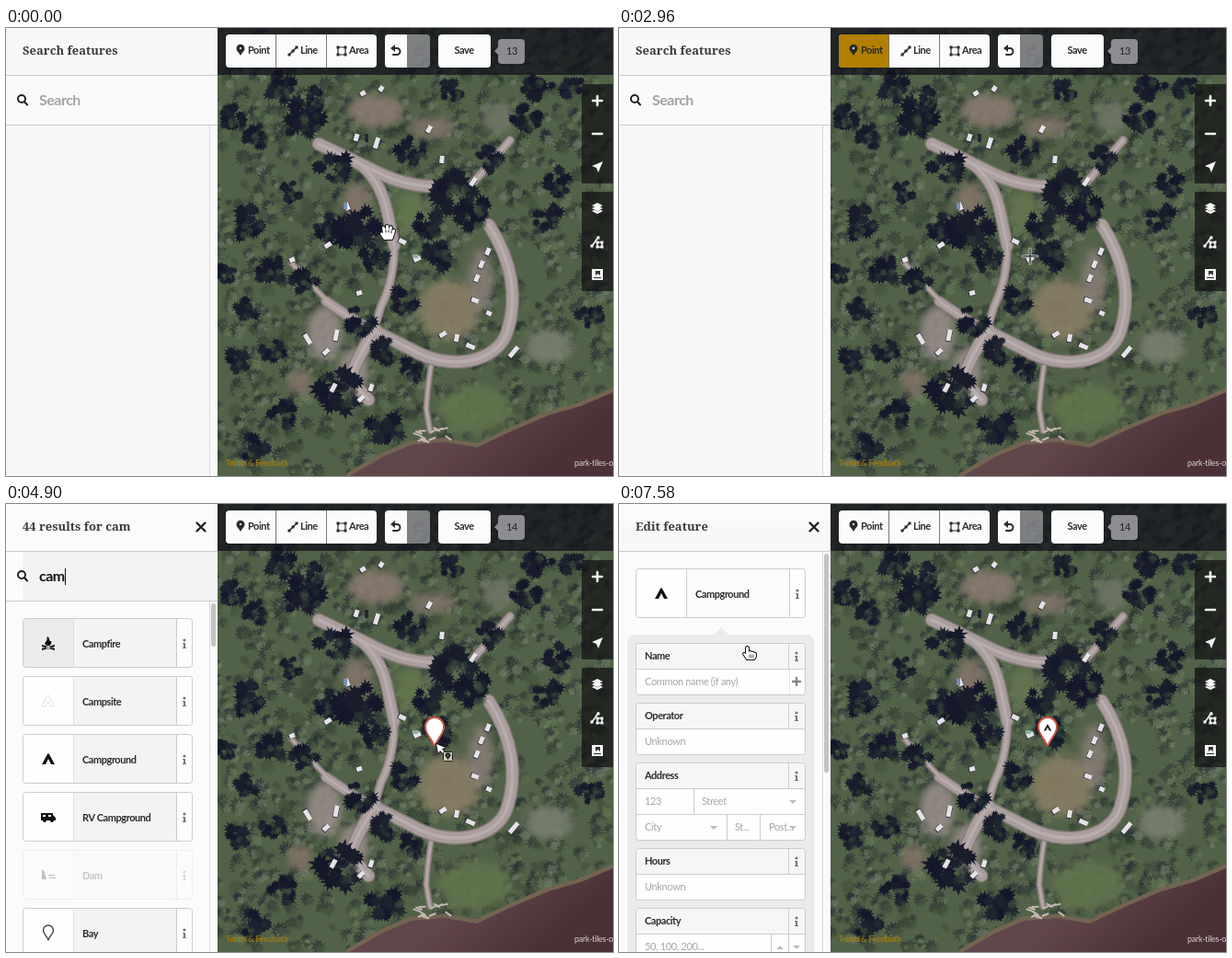
Animation, 660 px wide and 487 px high, one loop 8 s. Source, as an HTML page with a canvas:

```html
<!DOCTYPE html>
<html lang="en">
<head>
<meta charset="utf-8">
<title>Map editor: adding a point</title>
<style>
html, body { margin: 0; width: 100%; height: 100%; overflow: hidden; background: #f7f7f7; }
canvas { display: block; width: 660px; height: 487px; }
</style>
</head>
<body>
<canvas id="stage" width="660" height="487"></canvas>
<script>
const W = 660, H = 487, LOOP = 8000, SIDE = 230;
const TAU = Math.PI * 2;
const INK = '#2b2b2b', LINE = '#cccccc', PALE = '#a6a6a6';
const stage = document.getElementById('stage').getContext('2d');
let g = stage;

// ---------- drawing helpers ----------
function rect(x, y, w, h, color) {
  g.fillStyle = color;
  g.fillRect(x, y, w, h);
}
function box(x, y, w, h, r, fill, line) {
  g.beginPath();
  g.roundRect(x, y, w, h, r);
  if (fill) { g.fillStyle = fill; g.fill(); }
  if (line) { g.strokeStyle = line; g.lineWidth = 1; g.stroke(); }
}
function shape(d, x, y, fill, line, width = 1) {
  const p = new Path2D(d);
  g.save();
  g.translate(x, y);
  g.lineJoin = g.lineCap = 'round';
  if (line) { g.strokeStyle = line; g.lineWidth = width; g.stroke(p); }
  if (fill) { g.fillStyle = fill; g.fill(p); }
  g.restore();
}
function text(s, x, y, { size = 11, bold = true, color = INK, align = 'left', gap } = {}) {
  g.font = `${bold ? 'bold ' : ''}${size}px Lato, sans-serif`;
  g.letterSpacing = `${gap ?? (bold ? -0.45 : -0.35)}px`;
  g.textAlign = align;
  g.fillStyle = color;
  g.fillText(s, x, y);
}
function title(s) {
  g.font = 'bold 13px "Noto Serif", serif';
  g.letterSpacing = '0px';
  g.textAlign = 'left';
  g.fillStyle = '#3a3a3a';
  g.fillText(s, 18, 29);
}

// ---------- aerial picture, painted once ----------
function random(seed) {
  return () => {
    seed = (seed + 0x6D2B79F5) | 0;
    let n = Math.imul(seed ^ (seed >>> 15), 1 | seed);
    n = (n + Math.imul(n ^ (n >>> 7), 61 | n)) ^ n;
    return ((n ^ (n >>> 14)) >>> 0) / 4294967296;
  };
}

const SHADE = [
  [246, 98, 16], [272, 118, 15], [322, 100, 24], [336, 78, 14], [356, 152, 20], [310, 178, 13],
  [350, 218, 16], [386, 222, 29], [398, 250, 17], [262, 212, 20], [285, 262, 20], [325, 275, 17],
  [262, 304, 14], [486, 178, 26], [508, 200, 20], [462, 212, 19], [468, 246, 19], [442, 134, 18],
  [526, 142, 15], [566, 98, 17], [578, 62, 18], [600, 168, 17], [588, 206, 17], [636, 312, 16],
  [618, 66, 15], [384, 318, 17], [362, 394, 25], [412, 350, 16], [440, 372, 15], [414, 434, 21],
  [432, 294, 18], [252, 362, 16], [290, 350, 15], [268, 458, 17], [302, 420, 17], [240, 268, 13],
  [484, 66, 14], [298, 64, 17]
];
const CLEARINGS = [
  [402, 90, 30, 18, '#8d7c72'], [464, 108, 26, 12, '#7f7468'], [482, 306, 34, 33, '#8c8067'],
  [346, 332, 19, 30, '#9b8d8b'], [382, 190, 15, 22, '#86766c'], [516, 274, 13, 34, '#8b7f78'],
  [440, 200, 18, 22, '#65784f'], [378, 372, 16, 24, '#9d8f8e'], [590, 346, 26, 18, '#7c8272'],
  [510, 415, 40, 26, '#63764e'], [535, 98, 18, 17, '#747a68'], [320, 385, 13, 14, '#857268']
];
const ROADS = [
  ['M340 126Q370 140 402 156T464 172', 12], ['M382 146Q407 163 415 202T422 236', 11],
  ['M422 232Q423 272 408 302L400 328', 7], ['M508 168L526 148L548 122', 7],
  ['M525 214C552 256 556 296 545 330S482 374 440 349L402 330', 12],
  ['M348 297Q372 314 402 331', 9], ['M402 328Q382 356 374 382L394 404', 12],
  ['M462 368Q458 394 457 414L461 438', 4], ['M310 255L352 300', 4]
];
const CARS = [
  [381, 119, .3, 4], [403, 125, .3, 6], [388, 71, 1, 3], [408, 66, .6, 3], [460, 110, .5, 4],
  [474, 143, .1, 4], [508, 167, .6, 5], [371, 194, -.4, 4], [431, 232, 2, 4], [447, 251, 1.1, 4],
  [350, 236, 1, 4], [524, 243, .4, 4], [517, 257, .4, 4], [512, 272, .4, 4], [510, 296, 1.9, 4],
  [525, 310, 2, 3], [475, 333, 1, 4], [490, 337, .2, 4], [505, 346, 2, 5], [552, 352, .7, 7],
  [328, 338, 2.6, 6], [359, 334, .2, 6], [348, 352, .8, 4], [356, 391, .5, 5], [386, 403, .8, 4],
  [397, 391, .3, 4], [384, 288, 1.3, 3], [311, 252, 1.2, 3]
];

function paintMap() {
  const canvas = document.createElement('canvas');
  canvas.width = W;
  canvas.height = H;
  g = canvas.getContext('2d');
  const rnd = random(41);
  const between = (a, b) => a + rnd() * (b - a);
  const pick = list => list[Math.floor(rnd() * list.length)];

  function crown(x, y, r, color) {
    const n = 9 + Math.floor(rnd() * 5), turn = rnd() * TAU;
    g.beginPath();
    for (let i = 0; i < n * 2; i++) {
      const a = turn + i * Math.PI / n, d = r * (i % 2 ? between(.45, .7) : between(.8, 1.2));
      g.lineTo(x + Math.cos(a) * d, y + Math.sin(a) * d);
    }
    g.fillStyle = color;
    g.fill();
  }

  rect(SIDE, 0, W - SIDE, H, '#526248');
  for (let i = 0; i < 1300; i++) {
    const x = between(SIDE, W), y = between(0, H), r = between(4, 10);
    g.globalAlpha = .5;
    crown(x - 3, y - 3, r, pick(['#252e2d', '#1e2430', '#39463a']));
    g.globalAlpha = .6;
    crown(x, y, r * .8, pick(['#4b5d40', '#5d704e', '#6b7e59', '#43543c', '#74836a']));
  }
  g.globalAlpha = .85;
  g.filter = 'blur(4px)';
  for (const [x, y, rx, ry, color] of CLEARINGS) {
    g.beginPath();
    g.ellipse(x, y, rx, ry, 0, 0, TAU);
    g.fillStyle = color;
    g.fill();
  }
  g.filter = 'blur(.7px)';
  g.globalAlpha = 1;
  for (const [d, w] of ROADS) shape(d, 0, 0, null, '#857b76', w + 3);
  for (const [d, w] of ROADS) shape(d, 0, 0, null, '#aa9d9e', w);
  for (const [d, w] of ROADS) shape(d, 0, 0, null, '#b8acac', w * .3);

  for (const [x, y, r] of SHADE) {
    for (let i = 0; i < 15; i++) {
      const a = rnd() * TAU, d = r * Math.sqrt(rnd()) * .85;
      crown(x + Math.cos(a) * d, y + Math.sin(a) * d, between(.25, .5) * r, pick(['#15182a', '#191d2b', '#1d2430']));
    }
    g.globalAlpha = .6;
    for (let i = 0; i < 5; i++) {
      crown(x + between(-.2, .8) * r, y + between(-.2, .8) * r, r * .25, pick(['#33413a', '#41523d', '#26302f']));
    }
    g.globalAlpha = 1;
  }

  for (const [x, y, a, len] of CARS) {
    g.save();
    g.translate(x, y);
    g.rotate(a);
    rect(-3, -len + 1, 6, len * 2, '#292a38');
    rect(-2.5, -len, 5, len * 2, '#e4e2e5');
    g.restore();
  }
  rect(390, 115, 4, 9, '#252638');
  rect(367, 190, 4, 7, '#7790b0');
  rect(442, 246, 6, 4, '#88b0a0');

  // shore and water
  const shore = 'M660 396L625 411L590 421L550 438L512 456L476 450L441 453L410 466L374 487';
  shape(shore, 0, 0, null, '#726451', 9);
  const water = g.createLinearGradient(500, 430, 560, 500);
  water.addColorStop(0, '#61464a');
  water.addColorStop(1, '#4b3136');
  shape(shore + 'H660Z', 0, 0, water);
  for (let i = 0; i < 13; i++) {
    g.save();
    g.translate(between(438, 484), between(434, 450));
    g.rotate(between(-.7, .7));
    rect(-4, -1, 8, 2, '#c4b7b2');
    g.restore();
  }
  g.filter = 'none';
  rect(SIDE, 0, W - SIDE, 51, 'rgba(14,14,25,.72)');
  rect(626, 61, 34, 108, 'rgba(18,18,20,.72)');
  rect(626, 178, 34, 108, 'rgba(18,18,20,.72)');
  g = stage;
  return canvas;
}
const map = paintMap();

// ---------- icons ----------
const PIN = 'M0 6C-2 2-4.5 1-4.5-1.8A4.5 4.5 0 0 1 4.5-1.8C4.5 1 2 2 0 6Z';
const TENT = 'M0-6L1-5L7 6H3L0 0L-3 6H-7L-1-5Z';
const FIRE = 'M-1-7C3-4 0-2 3-2C4 1 2 3 0 3C-5 3-4-1-2-2C-1-4-2-5-1-7ZM-7 2L7 6V8L-7 4ZM7 2L-7 6V8L7 4Z';
const RV = 'M-8-4H5V-2L8 1V4H6A2 2 0 0 1 2 4H-2A2 2 0 0 1-6 4H-8ZM-6-2V0H-3V-2ZM0-2V0H3V-2Z';
const DAM = 'M-7-5H-5L-2 5H-7ZM0 0H7V1H0ZM1 3H8V4H1Z';
const DIVER = 'M-7-5L-4-4L0 1L5 2L8 6L4 5L0 4L-4 0ZM-1-2A2 2 0 1 1 3-2A2 2 0 1 1-1-2Z';
const CROSS = 'M-4.5-4.5L4.5 4.5M4.5-4.5L-4.5 4.5';
const ICONS = { Campfire: FIRE, Campground: TENT, 'RV Campground': RV, Dam: DAM, 'Scuba Diving': DIVER };

function presetIcon(name, y) {
  if (name === 'Campsite') shape('M0-6L7 6H3L0 1L-3 6H-7Z', 46, y, null, '#e2e2e2');
  else if (ICONS[name]) shape(ICONS[name], 46, y, '#111');
  else shape('M0 8C-2 3-5.5 1-5.5-2.5A5.5 5.5 0 0 1 5.5-2.5C5.5 1 2 3 0 8Z', 46, y, null, '#444', 1.4);
}
function info(x, y) {
  g.beginPath();
  g.arc(x, y - 4, 1.6, 0, TAU);
  g.fillStyle = '#777';
  g.fill();
  shape('M-2-1H1V4H2V5H-2V4H-1V0H-2Z', x, y, '#777');
}
function nodes(points, x, y, color) {
  for (const [dx, dy] of points) rect(x + dx - 1.5, y + dy - 1.5, 3, 3, color);
}
const CORNERS = [[-4, -4], [4, -4], [4, 4], [-4, 4]];

// ---------- toolbar and map controls ----------
function toolbar(s) {
  box(239, 7, 164, 36, 4, '#fbfbfb');
  if (s.tool !== 'idle') box(239, 7, 55, 36, [4, 0, 0, 4], s.tool === 'on' ? '#b27f00' : '#ececec');
  rect(293, 7, 1, 36, '#777');
  rect(348, 7, 1, 36, '#777');
  shape(PIN, 255, 24, INK);
  rect(254, 21, 2, 2, '#fff');
  text('Point', 263, 28);
  shape('M-4 4L4-4', 312, 25, null, INK, 1.5);
  nodes([[-4, 4], [0, 0], [4, -4]], 312, 25, INK);
  text('Line', 320, 28);
  shape('M-4-4H4V4H-4Z', 365, 25, null, INK, 1.2);
  nodes(CORNERS, 365, 25, INK);
  text('Area', 373, 28);

  box(412, 7, 24, 36, [4, 0, 0, 4], '#fbfbfb');
  box(436, 7, 25, 36, [0, 4, 4, 0], 'rgba(255,255,255,.42)');
  const arrow = 'M-2-3H1A3.5 3.5 0 0 1 1 4H-3';
  shape(arrow, 424, 25, null, INK, 2);
  shape('M-6-3L-1-7V1Z', 424, 25, INK);
  g.save();
  g.translate(449, 25);
  g.scale(-1, 1);
  shape(arrow, 0, 0, null, '#77777c', 2);
  shape('M-6-3L-1-7V1Z', 0, 0, '#77777c');
  g.restore();
  box(470, 7, 57, 36, 4, '#fbfbfb');
  text('Save', 498, 28, { align: 'center' });
  box(535, 12, 29, 27, 4, '#8c8c91');
  shape('M0 0L5-5V5Z', 531, 25, '#8c8c91');
  text(s.count, 550, 29, { bold: false, align: 'center', color: '#222' });
}
function controls() {
  const white = '#f6f6f6';
  shape('M-5 0H5M0-5V5', 643, 79, null, white, 2.6);
  shape('M-5 0H5', 643, 115, null, white, 2.6);
  shape('M6-6L1 6L-1 1L-6-1Z', 643, 151, white);
  for (const dy of [3, 0, -3]) {
    shape('M0-4L6-1L0 2L-6-1Z', 643, 197 + dy, white, dy < 0 ? null : '#333', .8);
  }
  shape('M-6 4L-3 0L1-6M0 0H5V5H0Z', 643, 233, null, white, 1.6);
  nodes([[-6, 4], [1, -5], [0, 0], [5, 0], [5, 5], [0, 5]], 643, 233, white);
  shape('M-6-6H6V6H-6ZM-4 3V4H4V3ZM-2-4H3V1L.5-1L-2 1Z', 643, 268, white);
  shape('M-2-4H3V1L.5-1L-2 1Z', 643, 268, '#333');
  text('Terms & Feedback', 239, 476, { size: 9, bold: false, gap: -.25, color: '#b57f00' });
  text('park-tiles-o', 618, 476, { size: 9, bold: false, gap: -.25, color: '#d5d0d0' });
}
function tooltip(alpha) {
  if (!alpha) return;
  g.save();
  g.globalAlpha = alpha;
  shape('M-7 6L0 0L7 6Z', 283, 55, 'rgba(255,255,255,.8)');
  rect(230, 61, 180, 72, 'rgba(240,240,238,.88)');
  rect(230, 133, 180, 36, 'rgba(228,228,228,.92)');
  const lines = ['Add visitor centers, entrance', 'stations, picnic areas, or other', 'points of interest to the map.'];
  lines.forEach((s, i) => text(s, 320, 82 + i * 18, { bold: false, align: 'center' }));
  text('Shortcut:', 296, 154, { bold: false });
  text('1', 339, 154);
  g.restore();
}
function pin(kind) {
  if (!kind) return;
  const drop = 'M0 18C-3 11-9 6-9-1A9 9 0 0 1 9-1C9 6 3 11 0 18Z';
  shape(drop, 466, 243, '#fff', '#d4543f', 4);
  shape(drop, 466, 243, '#fff', '#7a5b52', .7);
  if (kind === 'tent') {
    g.save();
    g.translate(466, 243);
    g.scale(.6, .6);
    shape(TENT, 0, 0, '#222');
    g.restore();
  }
}

// ---------- sidebar ----------
function close() { shape(CROSS, 212, 25, null, '#222', 2.4); }
function scroller(y, h) {
  rect(221, y - 2, 1, H, '#d9d9d9');
  rect(222, y - 2, 8, H, '#fafafa');
  if (h) box(223, y, 5, h, 3, '#c3c3c3');
}
function searchRow(value) {
  rect(0, 52, SIDE, 53, value === null ? '#fafafa' : '#f3f3f3');
  if (value !== null) rect(0, 52, 18, 53, '#fcfcfc');
  rect(0, 51, SIDE, 1, LINE);
  rect(0, 105, SIDE, 1, LINE);
  shape('M3-1A4 4 0 1 1-5-1A4 4 0 1 1 3-1M2 2L5 5.5', 18, 78, null, '#222', 2);
  const style = { size: 16, gap: -.5 };
  if (value) text(value, 36, 84, { ...style, color: '#111' });
  else text('Search', 36, 84, { ...style, color: '#a3a3a3' });
  if (value !== null) {
    const end = value ? 36 + g.measureText(value).width : 36;
    rect(Math.round(end), 70, 1, 18, '#111');
  }
}
function preset(name, y, first, plain) {
  g.save();
  if (name === 'Dam') g.globalAlpha = .25;
  box(18.5, y + .5, 184, 53, 3, plain ? '#fbfbfb' : '#f3f3f3');
  box(18.5, y + .5, 55, 53, [3, 0, 0, 3], first ? '#ebebeb' : '#fefefe');
  box(185.5, y + .5, 17, 53, [0, 3, 3, 0], '#fdfdfd');
  box(18.5, y + .5, 184, 53, 3, null, LINE);
  rect(73, y, 1, 54, plain ? LINE : '#dedede');
  rect(185, y, 1, 54, LINE);
  presetIcon(name, y + 27);
  text(name, 83, y + 32);
  info(194, y + 28);
  g.restore();
}
function featurePane() {
  rect(0, 0, SIDE, H, '#f8f8f8');
  title('Search features');
  searchRow(null);
  scroller(108, 0);
}
function listPane(s) {
  rect(0, 0, SIDE, H, '#fbfbfb');
  title(s.list.title);
  close();
  searchRow(s.search);
  s.list.names.forEach((name, i) => preset(name, 124 + i * 63, i === 0));
  scroller(108, s.list.thumb);
}
function field(label, y, rows = 1) {
  box(18.5, y + .5, 184, 28 + rows * 28, 3, '#fefefe');
  box(18.5, y + .5, 184, 28, [3, 3, 0, 0], '#f6f6f6');
  box(18.5, y + .5, 184, 28 + rows * 28, 3, null, LINE);
  for (let i = 1; i <= rows; i++) rect(18, y + 28 * i, 185, 1, LINE);
  rect(184, y, 1, 28, LINE);
  text(label, 28, y + 18);
  info(193, y + 15);
}
function hint(s, x, y) { text(s, x, y + 4, { bold: false, color: PALE }); }
function caret(x, y, up) { shape(up ? 'M-4 2H4L0-2Z' : 'M-4-2H4L0 2Z', x, y, '#bbb'); }
function editPane() {
  rect(0, 0, SIDE, H, '#fbfbfb');
  rect(0, 18, SIDE, 33, '#f8f8f8');
  rect(0, 51, SIDE, 1, LINE);
  title('Edit feature');
  close();
  preset('Campground', 70, false, true);
  shape('M-9 9L0 0L9 9Z', 111, 134, '#ebebeb');
  box(9, 142, 203, 400, 8, '#ebebeb');
  field('Name', 151);
  hint('Common name (if any)', 28, 193);
  rect(185, 179, 1, 28, '#e4e4e4');
  shape('M-4 0H4M0-4V4', 193, 193, null, '#888', 2.4);
  field('Operator', 216);
  hint('Unknown', 28, 258);
  field('Address', 281, 2);
  hint('123', 28, 323);
  rect(81, 309, 1, 28, LINE);
  hint('Street', 90, 323);
  caret(189, 324);
  hint('City', 28, 351);
  caret(103, 352);
  rect(117, 337, 1, 28, LINE);
  hint('St...', 126, 351);
  rect(153, 337, 1, 28, LINE);
  hint('Post...', 163, 351);
  caret(189, 352);
  field('Hours', 374);
  hint('Unknown', 28, 416);
  field('Capacity', 439);
  hint('50, 100, 200...', 28, 481);
  rect(165, 467, 1, 28, LINE);
  rect(184, 467, 1, 28, LINE);
  caret(175, 482, true);
  caret(193, 482);
  scroller(54, 238);
}
function sidebar(s) {
  g.save();
  g.beginPath();
  g.rect(0, 0, SIDE, H);
  g.clip();
  if (!s.list) featurePane();
  else {
    g.save();
    g.translate(-SIDE * s.slide, 0);
    if (s.slide < 1) listPane(s);
    g.translate(SIDE, 0);
    if (s.slide > 0) editPane();
    g.restore();
  }
  g.restore();
}

// ---------- pointers ----------
const POINTERS = {
  hand(x, y) {
    shape('M-4 8L-8 2Q-8-1-5 1L-6-5Q-5-8-3-5L-2-2V-7Q0-9 1-7V-2L2-6Q4-8 5-5L4-1L6-3Q8-4 8-1L6 5L5 8Z', x, y, '#fff', '#111', 2);
    shape('M-2-2V0M1-2V0M4-1V1', x, y, null, '#222');
  },
  finger(x, y) {
    shape('M-3 7L-7 1Q-7-1-4 1V-6Q-3-8-1-6V-1Q1-3 2-1Q4-2 5 0Q7-1 7 2V4L5 7Z', x, y, '#fff', '#111', 2);
    shape('M0 2V5M2 2V5M4 2V5', x, y, null, '#333', .8);
  },
  cross(x, y) {
    const d = 'M-8 0H8M0-8V8';
    shape(d, x, y, null, '#c4c4c4', 3);
    shape(d, x, y, null, '#111');
  },
  place(x, y) {
    shape('M0 0L10 4L6 5L9 9L7 10L4 7L2 10Z', x, y, '#fff', '#111', 2);
    box(x + 7.5, y + 8.5, 10, 10, 1, '#c9cbb9', '#222');
    shape('M0 4C-1 1-3 0-3-1A3 3 0 0 1 3-1C3 0 1 1 0 4Z', x + 12.5, y + 13.5, '#222');
    rect(x + 12, y + 12, 1, 1, '#fff');
  }
};

// ---------- timeline: [time, value], values hold until the next ----------
const MORE = ['Campfire', 'Campsite', 'Campground', 'RV Campground'];
const LISTS = {
  start: { title: 'Select feature type', thumb: 0, names: ['Campground', 'Campsite', 'Picnic Area', 'Trailhead', 'Parking Lot', 'Viewpoint'] },
  ca: { title: '86 results for ca', thumb: 30, names: ['Cafe', ...MORE, 'Cape'] },
  cam: { title: '44 results for cam', thumb: 47, names: [...MORE, 'Dam', 'Bay'] },
  camp: { title: '27 results for camp', thumb: 80, names: [...MORE, 'Cape', 'Scuba Diving'] },
  campg: { title: '16 results for campg', thumb: 135, names: ['Campground', 'RV Campground', 'Cape', 'Campfire', 'Campsite', 'Scuba Diving'] }
};
const TRACKS = {
  tool: [[0, 'idle'], [1042, 'hover'], [1790, 'on'], [4160, 'idle']],
  tip: [[0, 0], [1042, .5], [1190, 1], [1790, .4], [1940, 0]],
  count: [[0, '13'], [4160, '14']],
  pin: [[0, ''], [4160, 'plain'], [7130, 'tent']],
  list: [[0, null], [4160, LISTS.start], [4750, LISTS.ca], [4900, LISTS.cam], [5050, LISTS.camp], [5350, LISTS.campg]],
  search: [[0, null], [4160, ''], [4750, 'ca'], [4900, 'cam'], [5050, 'camp'], [5200, 'campg']],
  slide: [[0, 0], [7130, .15], [7280, .5], [7430, .87], [7580, 1]],
  kind: [[0, 'hand'], [1042, 'finger'], [1940, 'cross'], [4010, 'place'], [6100, 'hand'], [6390, 'finger']]
};
// pointer moves: [start, end, steps, from, to]
const MOVES = [
  [450, 1190, 6, [415, 222], [276, 42]],
  [1940, 2080, 2, [276, 42], [334, 125]],
  [2220, 2520, 3, [334, 125], [443, 246]],
  [2820, 3260, 4, [443, 246], [468, 261]],
  [6100, 6390, 3, [468, 261], [189, 213]],
  [6540, 6690, 2, [189, 213], [142, 162]]
];
function at(track, t) {
  let value;
  for (const [time, v] of track) if (time <= t) value = v;
  return value;
}
function pointerAt(t) {
  let pos = MOVES[0][3];
  for (const [start, end, steps, from, to] of MOVES) {
    if (t < start) break;
    const gap = (end - start) / (steps - 1);
    const k = Math.min(steps, Math.floor((t - start) / gap + 1.001)) / steps;
    const e = k * k * (3 - 2 * k);
    pos = from.map((v, i) => Math.round(v + (to[i] - v) * e));
  }
  return pos;
}

function draw(t) {
  const s = {};
  for (const key in TRACKS) s[key] = at(TRACKS[key], t);
  g.clearRect(0, 0, W, H);
  g.drawImage(map, 0, 0);
  controls();
  pin(s.pin);
  toolbar(s);
  tooltip(s.tip);
  sidebar(s);
  POINTERS[s.kind](...pointerAt(t));
}
const begin = performance.now();
function tick() {
  draw((performance.now() - begin) % LOOP);
  requestAnimationFrame(tick);
}
tick();
</script>
</body>
</html>
```
